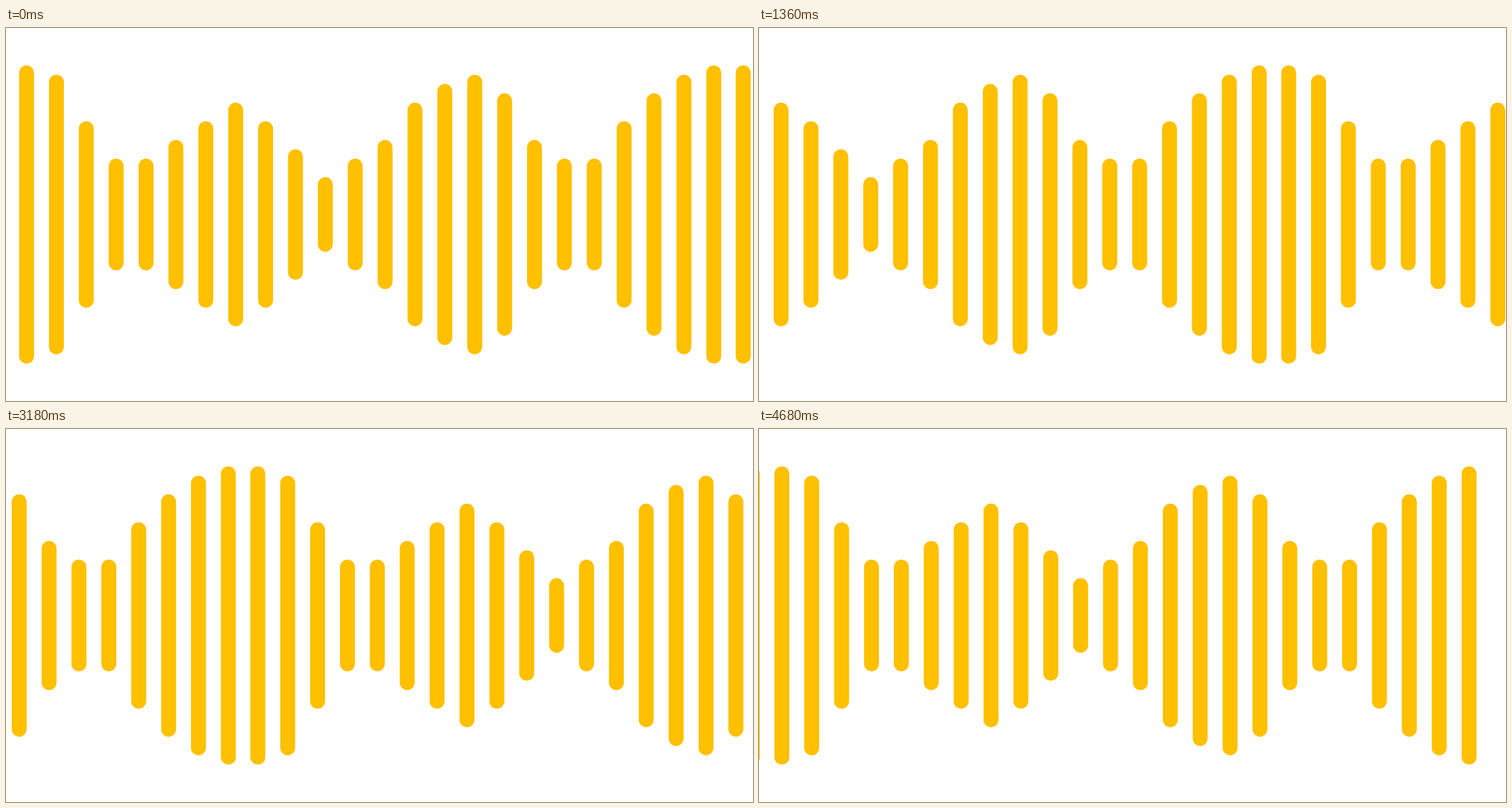
Recreate the animation shown at these times as an HTML page. Size 1058x529 px, loop 4.7 s.

```html
<!DOCTYPE html>
<html lang="en">
<head>
<meta charset="utf-8">
<title>Sound wave</title>
<style>
  html, body { margin: 0; width: 100%; height: 100%; overflow: hidden; background: #fff; }
  svg { display: block; width: 1058px; height: 529px; }
</style>
</head>
<body>
<svg viewBox="0 0 1058 529">
  <g id="strip" fill="#ffc000"></g>
</svg>
<script>
  const LOOP = 4700, STEP = 20;
  const SPEED = 0.2162;            // px per ms
  const UNIT = 529 / 40;
  const PITCH = 1058 / 25;
  const BAR_WIDTH = PITCH / 2;
  const FIRST_CENTER = 29.1;
  const COPY_OFFSET = 1015.1;
  const heights = [32, 30, 20, 12, 12, 16, 20, 24, 20, 14, 8, 12,
                   16, 24, 28, 30, 26, 16, 12, 12, 20, 26, 30, 32];

  const strip = document.getElementById('strip');

  function addBar(center, units) {
    const bar = document.createElementNS('http://www.w3.org/2000/svg', 'rect');
    const height = units * UNIT;
    const attrs = {
      x: center - BAR_WIDTH / 2, y: (529 - height) / 2,
      width: BAR_WIDTH, height, rx: BAR_WIDTH / 2
    };
    for (const name in attrs) bar.setAttribute(name, attrs[name]);
    strip.appendChild(bar);
  }

  // Two copies of the wave; the strip ends after the second one.
  for (let copy = 0; copy < 2; copy++) {
    heights.forEach((units, i) => addBar(FIRST_CENTER + copy * COPY_OFFSET + i * PITCH, units));
  }

  function render(ms) {
    const t = Math.floor((ms % LOOP) / STEP) * STEP;
    strip.setAttribute('transform', `translate(${-t * SPEED} 0)`);
  }

  let start = null;
  function tick(now) {
    if (start === null) start = now;
    render(Math.max(0, now - start));
    requestAnimationFrame(tick);
  }
  render(0);
  requestAnimationFrame(tick);
</script>
</body>
</html>
```
